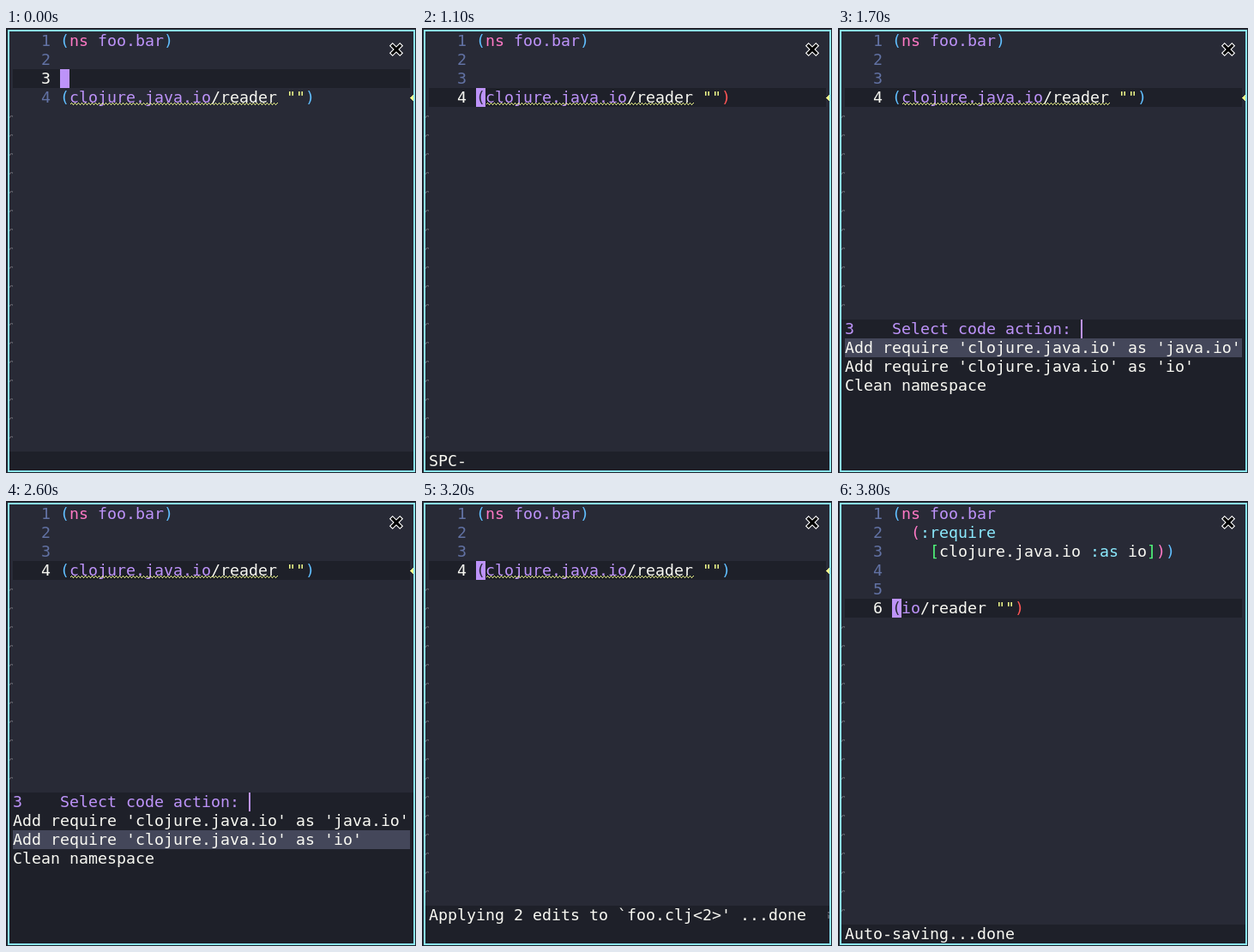
An HTML page for the animation above (5160 ms loop, 478 px wide and 519 px high).

```html
<!DOCTYPE html>
<html>
<head>
<meta charset="utf-8">
<style>
html, body { margin: 0; width: 100%; height: 100%; overflow: hidden; background: #20232d; }
svg { display: block; }
text { font: 18.27px "DejaVu Sans Mono", monospace; white-space: pre; }
</style>
</head>
<body>
<svg id="stage" width="478" height="519" viewBox="0 0 478 519"></svg>
<script>
const BG = '#282a36', DARK = '#1e2029', FG = '#f8f8f2', PURPLE = '#bd93f9', PINK = '#ff79c6',
  BLUE = '#61bfff', CYAN = '#8be9fd', GREEN = '#50fa7b', YELLOW = '#f1fa8c', RED = '#ff5555',
  NUMBER = '#6272a4', SELECT = '#44475a', DIM = '#565761';
const LOOP = 5160, ROW = 22, COL = 11, LEFT = 8, TOP = 4, BOTTOM = 516;

const rect = (x, y, w, h, fill) => `<rect x="${x}" y="${y}" width="${w}" height="${h}" fill="${fill}"/>`;
const path = (d, attrs) => `<path d="${d}" ${attrs}/>`;
const escapeText = s => s.replace(/&/g, '&amp;').replace(/</g, '&lt;');
const label = (col, top, text, fill, bold) =>
  `<text x="${LEFT + col * COL}" y="${top + 17}" fill="${fill}"${bold ? ' font-weight="700"' : ''}>${escapeText(text)}</text>`;

// A fringe bitmap: one 4-bit number per pixel row.
const bitmap = (x, y, rows, fill) => rows.map((bits, j) =>
  [0, 1, 2, 3].map(i => bits >> (3 - i) & 1 ? rect(x + i, y + j, 1, 1, fill) : '').join('')).join('');

const nsLine = [0, [BLUE, '('], [PINK, 'ns'], [PURPLE, ' foo.bar']];
const before = [
  [...nsLine, [BLUE, ')']], [0], [0],
  [0, [BLUE, '('], [PURPLE, 'clojure.java.io'], [FG, '/reader '], [YELLOW, '""'], [BLUE, ')']]
];
const after = [
  nsLine,
  [2, [PINK, '('], [CYAN, ':require']],
  [4, [GREEN, '['], [FG, 'clojure.java.io '], [CYAN, ':as'], [FG, ' io'], [GREEN, ']'], [PINK, ')'], [BLUE, ')']],
  [0], [0],
  [0, [BLUE, '('], [PURPLE, 'io'], [FG, '/reader '], [YELLOW, '""'], [BLUE, ')']]
];

function codeLine([indent, ...runs], index, s) {
  const top = TOP + index * ROW, current = index === s.row;
  let out = current ? rect(LEFT, top, 463, ROW, DARK) : '';
  out += label(3, top, String(index + 1), current ? FG : NUMBER);
  if (current && s.cursor) out += rect(63, top, COL, ROW, PURPLE);
  let col = 5 + indent;
  runs.forEach(([color, text], i) => {
    const match = current && s.match && i === runs.length - 1;
    const covered = current && s.cursor && i === 0;
    out += label(col, top, text, match ? RED : covered ? BG : color, match);
    col += text.length;
  });
  return out;
}

function warning() {
  return path('M74.5 89.5' + 'l2 -2l2 2'.repeat(60) + 'l2 -2',
    `fill="none" stroke="${YELLOW}" shape-rendering="crispEdges"`) +
    bitmap(471, 78, [1, 3, 7, 15, 7, 3, 1], YELLOW);
}

const echoTop = s => BOTTOM - ROW * (s.pick ? 8 : s.wrap ? 2 : 1);

function echoArea(s) {
  const top = echoTop(s);
  let out = rect(4, top, 471, BOTTOM - top, DARK);
  if (!s.pick) {
    out += label(0, top, s.echo || '', FG);
    if (s.wrap) out += bitmap(471, top + 7, [3, 3, 0, 2, 3, 3, 3, 3], DIM);
    return out;
  }
  out += label(0, top, '3', PURPLE) + label(5, top, 'Select code action:', PURPLE) +
    rect(283, top, 2, ROW, PURPLE) + rect(LEFT, top + s.pick * ROW, 463, ROW, SELECT);
  ["Add require 'clojure.java.io' as 'java.io'", "Add require 'clojure.java.io' as 'io'", 'Clean namespace']
    .forEach((text, i) => out += label(0, top + (i + 1) * ROW, text, FG));
  return out;
}

function pointer() {
  const cross = r => `M${455 - r} ${25 - r}l${2 * r} ${2 * r}M${455 + r} ${25 - r}l${-2 * r} ${2 * r}`;
  return path(cross(6.2), 'stroke="#fff" stroke-width="5.4"') + path(cross(5.4), 'stroke="#000" stroke-width="3.2"');
}

function draw(s) {
  const lines = s.lines;
  let out = rect(2, 2, 475, 516, CYAN) + rect(4, 4, 471, 512, BG);
  lines.forEach((line, i) => out += codeLine(line, i, s));
  for (let y = TOP + lines.length * ROW; y + ROW <= echoTop(s); y += ROW) out += bitmap(4, y + 10, [7, 13, 8], DIM);
  if (lines === before) out += warning();
  return out + echoArea(s) + pointer();
}

const edit = { lines: before, row: 3, cursor: true };
const done = { lines: after, row: 5, cursor: true };
const applied = { echo: "Applying 2 edits to `foo.clj<2>' ...done", wrap: true };
const steps = [
  [0, { lines: before, row: 2, cursor: true }],
  [730, edit],
  [830, { ...edit, match: true }],
  [1100, { ...edit, match: true, echo: 'SPC-' }],
  [1300, { ...edit, match: true, echo: 'SPC c-' }],
  [1530, { ...edit, match: true, echo: 'SPC c a' }],
  [1570, { ...edit, match: true }],
  [1700, { ...edit, cursor: false, pick: 1 }],
  [2600, { ...edit, cursor: false, pick: 2 }],
  [3170, edit],
  [3200, { ...edit, ...applied }],
  [3230, { ...done, ...applied }],
  [3300, { ...done, ...applied, match: true }],
  [3770, { ...done, match: true, echo: 'Auto-saving...' }],
  [3800, { ...done, match: true, echo: 'Auto-saving...done' }]
];

const stage = document.getElementById('stage');
const start = performance.now();
let shown;
function tick() {
  const t = (performance.now() - start) % LOOP;
  const state = steps.findLast(([at]) => at <= t)[1];
  if (state !== shown) stage.innerHTML = draw(shown = state);
  requestAnimationFrame(tick);
}
tick();
</script>
</body>
</html>
```
